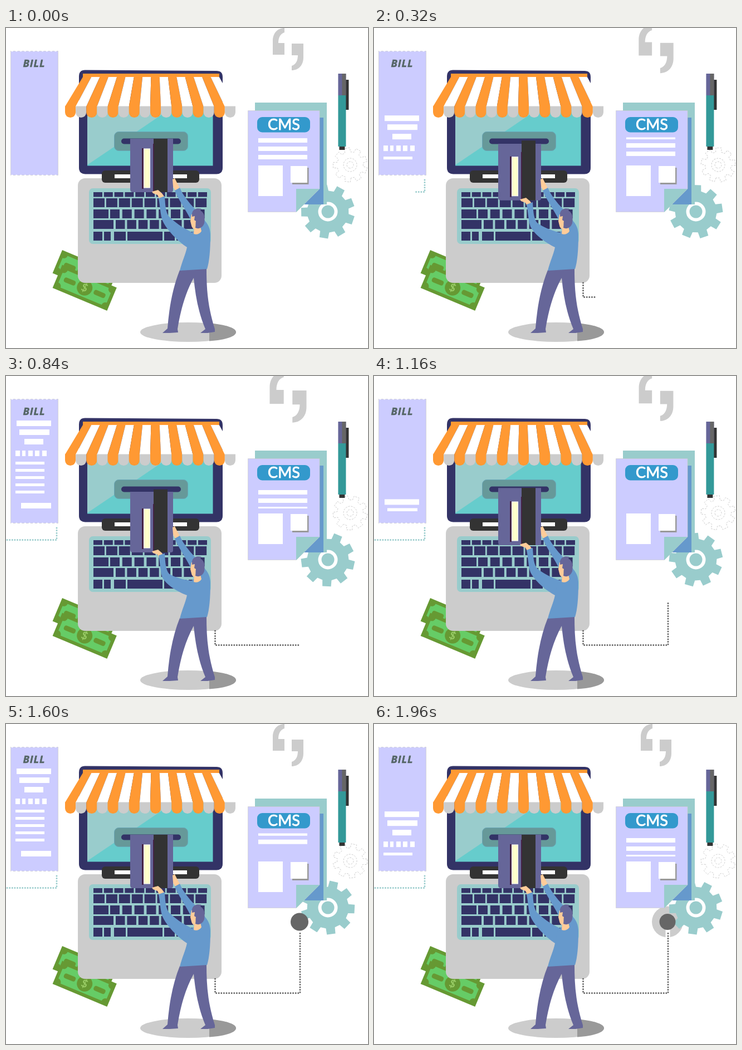
An HTML page that plays this animation: 650 px wide and 575 px high, repeating every 2000 ms.

```html
<!DOCTYPE html>
<html lang="en">
<head>
<meta charset="utf-8">
<title>Online shop</title>
<style>
html, body { margin: 0; width: 100%; height: 100%; overflow: hidden; background: #fff; }
svg { display: block; width: 650px; height: 575px; }
.dots { fill: none; stroke-width: 3; stroke-linecap: round; stroke-dasharray: 0 4.6; }
</style>
</head>
<body>
<svg viewBox="0 0 650 575">
  <defs>
    <clipPath id="billClip"><rect x="8" y="78" width="86" height="165"/></clipPath>
    <clipPath id="pageClip"><rect x="440" y="196.500" width="115" height="41.500"/></clipPath>
    <g id="note">
      <rect width="106" height="45" fill="#693"/>
      <path d="M13 6H93A7 7 0 0 0 100 13V32A7 7 0 0 0 93 39H13A7 7 0 0 0 6 32V13A7 7 0 0 0 13 6Z" fill="#6c6"/>
      <g fill="#693"><circle cx="53" cy="22.500" r="14"/><rect x="13" y="18" width="22" height="9" rx="4"/><rect x="71" y="18" width="22" height="9" rx="4"/></g>
      <text x="53" y="29" text-anchor="middle" font-family="Lato, sans-serif" font-weight="700" font-size="19" fill="#9c6">$</text>
    </g>
    <path id="quote" d="M479 48V23C479 9 488 0 500 0V8C493 10 489 17 489 27H500V48Z"/>
  </defs>

  <!-- bill -->
  <rect x="8.500" y="41.500" width="85" height="223" fill="#ccf" stroke="#ccc" stroke-width=".7"/>
  <path d="M11 40.500H94M11 265.500H94" stroke="#fff" stroke-width="4" stroke-linecap="round" stroke-dasharray="0 7.800"/>
  <text x="30.500" y="70" font-family="'Open Sans', sans-serif" font-weight="700" font-style="italic" font-size="18.500" letter-spacing=".8" fill="#566" stroke="#566" stroke-width=".5">BILL</text>
  <g clip-path="url(#billClip)"><g id="billRows" fill="#fff"></g></g>

  <g id="quotes" fill="#ccc">
    <use href="#quote"/>
    <use href="#quote" transform="rotate(180 506.500 38)"/>
  </g>

  <!-- money -->
  <use href="#note" transform="translate(101 399) rotate(22.700)"/>
  <use href="#note" transform="translate(101 425.500) rotate(22.700)"/>

  <!-- laptop -->
  <path d="M142 75.500L378 77Q389 77 389 88V251Q389 262.500 378 262.500H142Q131 262 131 251V87Q131 75.500 142 75.500Z" fill="#336"/>
  <path d="M146 140H371.500V247.500H146Z" fill="#6cc"/>
  <path d="M146 140H303L146 246Z" fill="#9cc"/>
  <path d="M138 82H383V89H138Z" fill="#f93"/>
  <g id="awning"></g>
  <rect x="129" y="270" width="258" height="188" rx="13" fill="#ccc"/>
  <rect x="172" y="256" width="175" height="22" rx="6" fill="#333"/>
  <rect x="195" y="263" width="130" height="7" fill="#fff"/>
  <rect x="149" y="288" width="219" height="100" rx="7" fill="#9cc"/>
  <g id="keys" fill="#336"></g>
  <rect x="194.500" y="186.500" width="132" height="34" rx="8" fill="#699" stroke="#69a5b5"/>
  <rect x="207" y="198.500" width="107" height="10" rx="5" fill="#336"/>
  <path id="cardBody" fill="#669"/>
  <path id="cardBand" fill="#333"/>
  <g id="cardMarks">
    <path d="M244 216H247V289H244ZM264 208H266V294H264Z" fill="#424"/>
    <rect x="247.500" y="217" width="11" height="70" fill="#ffc" stroke="#fff"/>
  </g>

  <!-- documents and gears -->
  <circle id="halo" cx="527" cy="355.500" fill="#ccc"/>
  <rect id="haloGap" x="523.500" y="365" width="8" height="20" fill="#fff"/>
  <g id="bigGear" fill="#9cc"><path/></g>
  <circle cx="578" cy="330" r="14.500" fill="#9cc" stroke="#fff" stroke-width="6"/>
  <path d="M447 134H576V317H447Z" fill="#9cc"/>
  <path d="M563 161H570V317H536Z" fill="#69c"/>
  <path d="M434.500 148.500H563V289L521 330.500H434.500Z" fill="#ccf" stroke="#ccc" stroke-width=".7"/>
  <path d="M521 289H563L521 331Z" fill="#9cc"/>
  <rect x="451" y="160" width="95" height="27.500" rx="9" fill="#39c"/>
  <text x="499" y="182.500" text-anchor="middle" font-family="Lato, sans-serif" font-size="27" fill="#fff" stroke="#fff" stroke-width=".9">CMS</text>
  <g clip-path="url(#pageClip)"><path id="pageRows" d="M453 198H541V206H453ZM453 213H541V221H453ZM453 228H541V236H453Z" fill="#fff"/></g>
  <path d="M453 247H497V302H453Z" fill="#fff"/>
  <path d="M514 251H543.500V281H514Z" fill="#999"/>
  <path d="M511 248H541V278H511Z" fill="#fff"/>
  <g id="smallGear" fill="#fff" stroke="#ccc" stroke-width=".9" stroke-dasharray="3 2"><path/><circle r="12"/><circle r="6"/></g>

  <!-- pen -->
  <g transform="translate(-.6)">
    <path d="M610 93H616V147H610Z" fill="#333"/>
    <path d="M597 82H611V121H597Z" fill="#669"/>
    <path d="M604 82H611V121H604Z" fill="#666"/>
    <path d="M597 121H611V213H597Z" fill="#399"/>
    <path d="M599 213H609V219H599Z" fill="#333"/>
  </g>

  <path id="leftDots" class="dots" stroke="#9cc"/>
  <path id="rightDots" class="dots" stroke="#666"/>
  <circle id="node" cx="527" cy="355.500" fill="#666"/>

  <!-- man -->
  <ellipse cx="327" cy="546.500" rx="86" ry="17.500" fill="#ccc"/>
  <path d="M365 530.500C395 533 413 539 413 546.500S395 560.500 365 562.500Z" fill="#999"/>
  <path d="M312 435L360 432C360 468 362 500 375 541L375 546L362 548H349L358 541C345 510 340 480 337 449C321 478 313 510 308 541L309 547L294 548H281L290 540C293 500 300 465 312 435Z" fill="#669"/>
  <path d="M299 272L303 270L309 282L312 288L304 293L300 284Z" fill="#fc9"/>
  <path id="hand" d="M262 294L273 291L280 297L285 304L276 308L272 300L264 297Z" fill="#fc9"/>
  <path id="arm" fill="#69c"/>
  <path d="M303 292L312 287C322 310 338 322 355 344C364 353 367 362 367 372C367 400 365 420 361 433L312 436C316 420 322 408 325 394L330 370L338 364C334 340 315 320 303 292Z" fill="#69c"/>
  <path d="M338 355L349 357L351 365C348 370 342 372 337 370Z" fill="#fc9"/>
  <path d="M333 335L345 334L346 359C340 363 334 361 333 355L331 347Z" fill="#fc9"/>
  <path d="M334 333C336 325 343 323 351 325L349 328C358 333 357 343 356 351C353 359 346 362 340 359C341 354 340 350 341 347L338 345L339 338L334 339Z" fill="#669"/>
</svg>
<script>
const $ = id => document.getElementById(id);
const set = (id, name, value) => $(id).setAttribute(name, value);
const box = (x, y, w, h) => `<rect x="${x}" y="${y}" width="${w}" height="${h}"/>`;
const clamp = v => Math.max(0, Math.min(1, v));
const ease = (t, a, b) => { const u = clamp((t - a) / (b - a)); return u * u * (3 - 2 * u); };
const range = n => [...Array(n).keys()];

$('billRows').innerHTML =
  [[19, 80, 62], [24, 96, 54], [33, 113, 34], [27, 228, 54]].map(([x, y, w]) => box(x, y, w, 10)).join('') +
  [[17, 8], [29, 6], [40, 8], [52, 8], [65, 8]].map(([x, w]) => box(x, 134, w, 10)).join('') +
  range(5).map(i => box(17, 154 + 13 * i, 52, 5)).join('');

$('awning').innerHTML = range(16).map(i => {
  const top = x => 138 + x * 15.3, low = x => 106 + x * 19.125, orange = i % 2 == 0;
  const l = low(i), r = low(i + 1);
  return `<path d="M${top(i)} 88H${top(i + 1)}L${r} 141H${l}Z" fill="${orange ? '#f93' : '#fff'}"/>` +
    `<path d="M${l} 140.500H${r}V151.500A9.560 9.560 0 0 1 ${l} 151.500Z" fill="${orange ? '#f93' : '#ccc'}"/>`;
}).join('');

const keyRow = (n, x, pitch, w, y, h) => range(n).map(i => box(x + i * pitch, y, w, h)).join('');
$('keys').innerHTML = keyRow(11, 157, 18.8, 16, 295, 8.5) + keyRow(9, 157, 22.9, 20, 306, 16) +
  box(157, 326, 27, 16) + keyRow(8, 187, 21.8, 17, 326, 16) +
  box(157, 345, 36, 16) + keyRow(8, 197, 20.4, 16.5, 345, 16) +
  [[157, 16], [176, 12], [194, 21], [218, 63], [284, 19], [306, 18], [328, 16], [347, 14]]
    .map(([x, w]) => box(x, 366, w, 16)).join('');

const TEETH = 9;
function gearPath(outer, inner) {
  const pts = range(TEETH).flatMap(k => [[-.22, inner], [-.16, outer], [.16, outer], [.22, inner]].map(([a, r]) => {
    a += k * 2 * Math.PI / TEETH;
    return (r * Math.cos(a)).toFixed(2) + ' ' + (r * Math.sin(a)).toFixed(2);
  }));
  return 'M' + pts.join('L') + 'Z';
}
$('bigGear').firstChild.setAttribute('d', gearPath(48.5, 37.5));
$('smallGear').firstChild.setAttribute('d', gearPath(31, 23.5));

// The first `len` pixels of a polyline.
function trace(pts, len) {
  if (len <= 0) return '';
  let d = 'M' + pts[0];
  for (let i = 1; i < pts.length && len > 0; i++) {
    const [[x, y], [u, v]] = [pts[i - 1], pts[i]];
    const side = Math.hypot(u - x, v - y), k = Math.min(1, len / side);
    d += `L${x + (u - x) * k} ${y + (v - y) * k}`;
    len -= side;
  }
  return d;
}
const leftWay = [[91, 273], [91, 294.5], [1, 294.5]];
const rightWay = [[375.5, 458], [375.5, 483.5], [528, 483.5], [528, 372]];

// Rows leave through the top of the page and come back from below.
function pageShift(t) {
  if (t < 600) return -.15 * Math.max(0, t - 280);
  return 40 - .137 * ((t - 600) % 560);
}

function draw(t) {
  const start = t < 1040 ? 0 : t < 1640 ? 1040 : 1640;
  set('billRows', 'transform', `translate(0 ${180 * (1 - clamp((t - start) / 560))})`);
  set('pageRows', 'transform', `translate(0 ${pageShift(t)})`);

  const size = 1 + .2 * (ease(t, 0, 520) - ease(t, 960, 1440));
  set('quotes', 'transform', `translate(506.5 37.5) scale(${size}) translate(-506.5 -37.5)`);

  const d = 22 * (ease(t, 0, 520) - ease(t, 880, 1380)), e = d * .75;
  const bodyTop = d > 12 ? 208 : 199 + d / 4;
  set('cardBody', 'd', `M223 ${bodyTop}H300V${291 + d}Q300 ${295 + d} 296 ${295 + d}H228Q223 ${295 + d} 223 ${290 + d}Z`);
  set('cardBand', 'd', `M265 ${199 + d * .22}H290V${295 + d}H265Z`);
  set('cardMarks', 'transform', `translate(0 ${d})`);
  set('hand', 'transform', `translate(0 ${d * .95})`);
  set('arm', 'd', `M274 ${306 + e}L285 ${302 + e}C286 ${320 + e} 287 ${332 + e} 293 ${339 + e}` +
    `C302 ${348 + e * .8} 318 ${360 + e * .4} 336 368L330 394L325 394` +
    `C308 ${383 + e * .3} 288 ${362 + e * .8} 281 ${346 + e}C277 ${336 + e} 277 ${320 + e} 274 ${306 + e}Z`);

  const turn = 99 + t * .04;
  set('bigGear', 'transform', `translate(578 330) rotate(${turn})`);
  set('smallGear', 'transform', `translate(618 246) rotate(${turn})`);

  set('leftDots', 'd', trace(leftWay, .2 * (t - 130)));
  set('rightDots', 'd', trace(rightWay, .25 * (t - 130)));
  const halo = ease(t, 1640, 1960);
  set('node', 'r', 16 * ease(t, 1300, 1520) - 1.5 * halo);
  set('halo', 'r', 28 * halo);
  set('haloGap', 'opacity', halo > 0 ? 1 : 0);
}

const begin = performance.now();
function tick() {
  const t = (performance.now() - begin) % 2000;
  draw(Math.floor(t / 40) * 40);
  requestAnimationFrame(tick);
}
tick();
</script>
</body>
</html>
```
